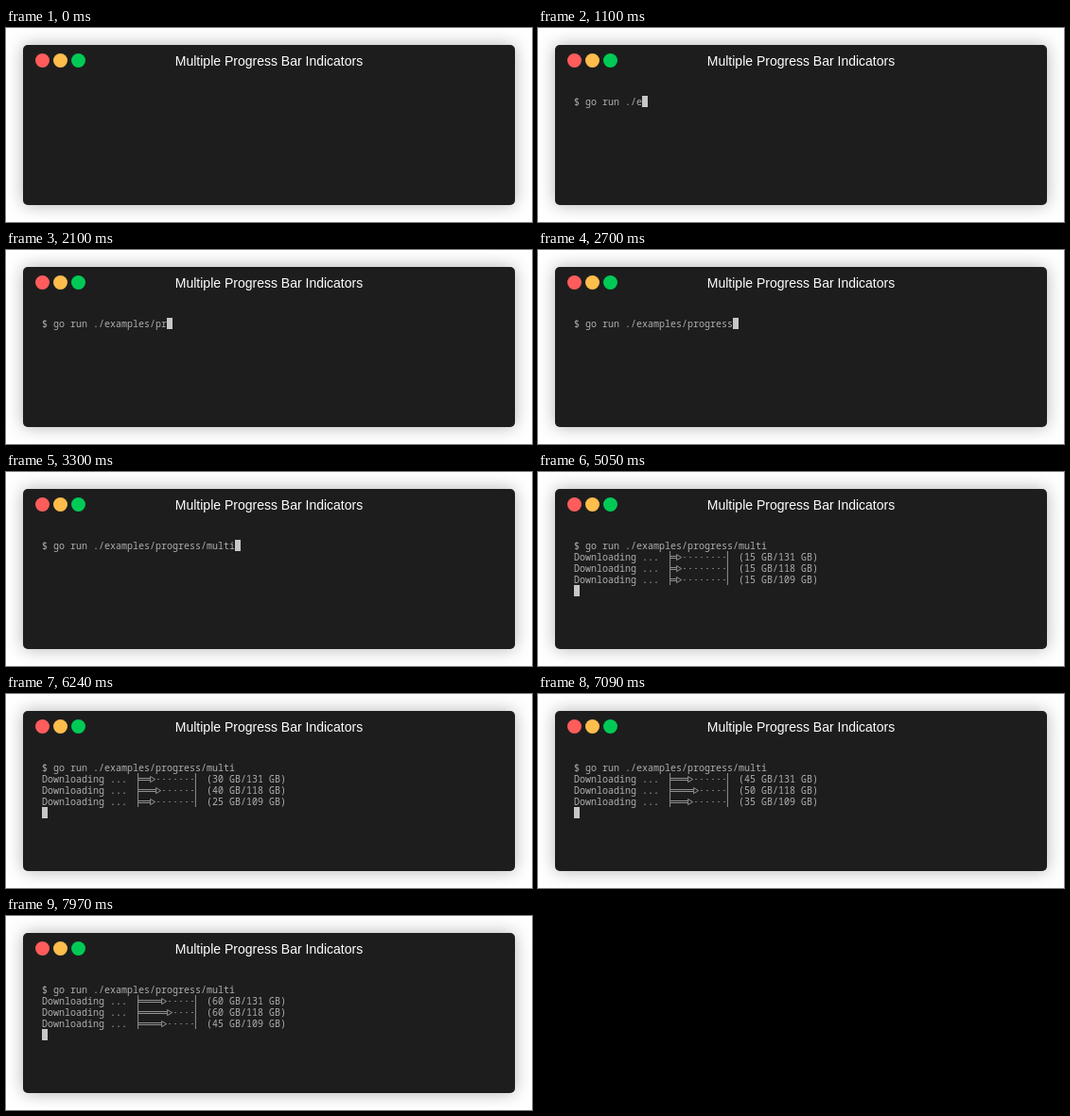
An HTML page for the animation above (8 s loop, 556 by 206 pixels).

```html
<!DOCTYPE html>
<html lang="en">
<head>
<meta charset="utf-8">
<title>Multiple Progress Bar Indicators</title>
<style>
  html, body { margin: 0; width: 100%; height: 100%; overflow: hidden; background: #fff; }
  .window {
    position: absolute; left: 18px; top: 18px; width: 520px; height: 170px;
    border-radius: 5px; background: #1d1d1d; box-shadow: 0 0 18px rgba(0, 0, 0, .3);
  }
  svg { position: absolute; left: 0; top: 0; }
  .title { font: 14px "Liberation Sans", Arial, sans-serif; fill: #fff; text-anchor: middle; }
  .terminal text { font: 10px "Noto Sans Mono", monospace; fill: #afafaf; white-space: pre; }
  .line { fill: none; stroke: #afafaf; stroke-width: .8; }
</style>
</head>
<body>
<div class="window"></div>
<svg width="556" height="206" viewBox="0 0 556 206">
  <circle cx="38.5" cy="34.5" r="7.5" fill="#ff5c5c"/>
  <circle cx="57.5" cy="34.5" r="7.5" fill="#ffbd4c"/>
  <circle cx="76.5" cy="34.5" r="7.5" fill="#00ca56"/>
  <text class="title" x="278" y="40">Multiple Progress Bar Indicators</text>
  <g class="terminal">
    <text id="prompt" x="38" y="82"></text>
    <g id="downloads"></g>
    <rect id="cursor" width="6" height="12" fill="#c7c7c7"/>
  </g>
</svg>
<script>
const LOOP = 8000, LEFT = 38, TOP = 72, CELL = 6, ROW = 12;
const BAR_COLUMN = 17, BAR_CELLS = 10, STEP_GB = 5;
const COMMAND = 'go run ./examples/progress/multi';
const TYPING_START = 100, TYPING_STEP = 100, RUN_START = 3800;
// Ticks at which the screen keeps its previous state.
const SKIPPED_TICKS = [500, 1400, 1700, 2000, 2300, 2500, 3100];

// Each download grows by STEP_GB at every listed time.
const downloads = [
  { total: 131, times: [4310, 4740, 4970, 5240, 5550, 6150, 6460, 6860, 6970, 7390, 7650, 7970] },
  { total: 118, times: [4030, 4700, 5050, 5240, 5490, 5700, 6050, 6150, 6460, 6860, 7480, 7740] },
  { total: 109, times: [4390, 4900, 5050, 5520, 6240, 6570, 7090, 7560, 7970] },
];

const byId = id => document.getElementById(id);
const prompt = byId('prompt'), cursor = byId('cursor'), list = byId('downloads');
const columnX = column => LEFT + column * CELL;

function add(tag, attributes, text = '') {
  const node = document.createElementNS('http://www.w3.org/2000/svg', tag);
  for (const name in attributes) node.setAttribute(name, attributes[name]);
  node.textContent = text;
  return list.appendChild(node);
}

downloads.forEach((item, index) => {
  item.y = TOP + (index + 1) * ROW;
  const baseline = item.y + 10;
  add('text', { x: LEFT, y: baseline }, 'Downloading ...');
  item.bar = add('path', { class: 'line' });
  item.dots = add('path', { fill: '#afafaf' });
  item.size = add('text', { x: columnX(29), y: baseline });
});

function drawDownload(item, time) {
  const gb = STEP_GB * item.times.filter(t => t <= time).length;
  const done = Math.floor(gb / item.total * BAR_CELLS);
  const left = columnX(BAR_COLUMN), right = left + BAR_CELLS * CELL;
  const tip = left + done * CELL, y = item.y;

  let bar = `M${left - .4} ${y}v12M${right + .4} ${y}v12`;
  if (done) bar += `M${left} ${y + 5.5}H${tip}M${left} ${y + 7.5}H${tip}`;
  bar += `M${tip + .6} ${y + 3.6}l5 3l-5 3z`;
  item.bar.setAttribute('d', bar);

  let dots = '';
  for (let x = tip + CELL; x < right; x += CELL) dots += `M${x + 2.4} ${y + 5.9}h1.2v1.2h-1.2z`;
  item.dots.setAttribute('d', dots);

  const amount = gb === 0 ? '0 B' : gb < 10 ? gb.toFixed(1) + ' GB' : gb + ' GB';
  item.size.textContent = `(${amount}/${item.total} GB)`;
}

function typedCount(time) {
  let tick = Math.floor(time / TYPING_STEP) * TYPING_STEP;
  if (SKIPPED_TICKS.includes(tick)) tick -= TYPING_STEP;
  return Math.min(COMMAND.length, (tick - TYPING_START) / TYPING_STEP);
}

function draw(time) {
  const visible = time >= TYPING_START, running = time >= RUN_START;
  const typed = typedCount(time);
  prompt.textContent = visible ? '$ ' + COMMAND.slice(0, typed) : '';
  cursor.setAttribute('visibility', visible ? 'visible' : 'hidden');
  cursor.setAttribute('x', columnX(running ? 0 : typed + 2));
  cursor.setAttribute('y', TOP + (running ? 4 * ROW : 0));
  list.setAttribute('visibility', running ? 'visible' : 'hidden');
  if (running) downloads.forEach(item => drawDownload(item, time));
}

const start = performance.now();
function frame() {
  draw((performance.now() - start) % LOOP);
  requestAnimationFrame(frame);
}
frame();
</script>
</body>
</html>
```
